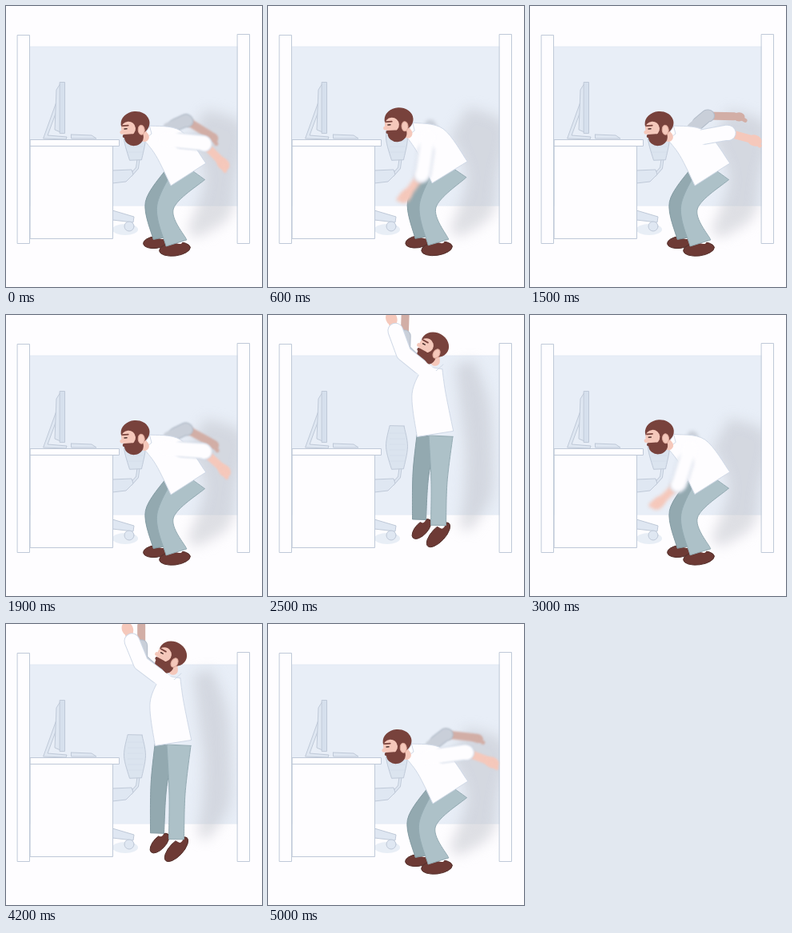
Animation, 320 px wide and 352 px high, one loop 5100 ms. Source, as an HTML page with a canvas:

```html
<!DOCTYPE html>
<html lang="en">
<head>
<meta charset="utf-8">
<title>Cubicle jump</title>
<style>
html, body { margin: 0; width: 100%; height: 100%; overflow: hidden; background: #fefdff; }
canvas { display: block; }
</style>
</head>
<body>
<canvas id="stage" width="320" height="352"></canvas>
<script>
const ctx = document.getElementById('stage').getContext('2d');
const LOOP = 5100, JUMP = 1700, STEP = 100;
const LINE = '#bfc9d8', PALE = '#dfe7f2', WHITE = '#fefdff', FOLD = '#d0d9e7';
const SKIN = '#f5c8bb', HAIR = '#78423c', SHOE = '#6d3a35';

// limbs as joints [x, y, width]: crouched, then stretched
const SHADOW = [
  [[238, 150, 46], [266, 165, 68], [268, 215, 40], [260, 255, 42], [232, 286, 14]],
  [[246, 60, 24], [258, 110, 36], [264, 170, 34], [262, 225, 34], [246, 268, 14]]];
const FAR_LEG = [
  [[212, 212, 28], [184, 248, 20], [192, 291, 16]],
  [[199, 152, 26], [191, 205, 20], [189, 267, 17]]];
const NEAR_LEG = [
  [[232, 206, 40], [199, 252, 21], [213, 297, 27]],
  [[216, 152, 30], [214, 215, 20], [213, 275, 19]]];
const TORSO = [
  [[175, 158, 18], [203, 172, 44], [228, 211, 52]],
  [[206, 66, 24], [201, 98, 42], [209, 149, 46]]];

const mix = (a, b, k) => a + (b - a) * k;
const morph = ([low, high], k) => low.map((joint, i) => joint.map((v, j) => mix(v, high[i][j], k)));

function ramp(x, from, to) {
  const k = Math.min(1, Math.max(0, (x - from) / (to - from)));
  return k * k * (3 - 2 * k);
}

function paint(fill, stroke) {
  if (fill) { ctx.fillStyle = fill; ctx.fill(); }
  if (stroke) { ctx.strokeStyle = stroke; ctx.lineWidth = 1; ctx.stroke(); }
}

function box(x, y, w, h, fill = WHITE, stroke = LINE) {
  ctx.beginPath();
  ctx.rect(x, y, w, h);
  paint(fill, stroke);
}

function poly(points, fill = PALE) {
  ctx.beginPath();
  for (const [x, y] of points) ctx.lineTo(x, y);
  ctx.closePath();
  paint(fill, LINE);
}

function oval(x, y, rx, ry, fill, stroke, turn = 0) {
  ctx.beginPath();
  ctx.ellipse(x, y, rx, ry, turn, 0, 7);
  paint(fill, stroke);
}

function line(points, color, width) {
  ctx.beginPath();
  for (const [x, y] of points) ctx.lineTo(x, y);
  ctx.strokeStyle = color;
  ctx.lineWidth = width;
  ctx.stroke();
}

// smooth closed outline around a chain of joints
function limb(joints, fill, stroke) {
  const left = [], right = [];
  joints.forEach(([x, y, w], i) => {
    const a = joints[Math.max(0, i - 1)], b = joints[Math.min(joints.length - 1, i + 1)];
    const turn = Math.atan2(b[1] - a[1], b[0] - a[0]);
    const dx = Math.sin(turn) * w / 2, dy = -Math.cos(turn) * w / 2;
    left.push([x + dx, y + dy]);
    right.unshift([x - dx, y - dy]);
  });
  ctx.beginPath();
  for (const side of [left, right]) {
    const at = i => side[Math.min(side.length - 1, Math.max(0, i))];
    ctx.lineTo(...side[0]);
    for (let i = 0; i < side.length - 1; i++) {
      const [a, b, c, d] = [at(i - 1), at(i), at(i + 1), at(i + 2)];
      ctx.bezierCurveTo(b[0] + (c[0] - a[0]) / 6, b[1] + (c[1] - a[1]) / 6,
        c[0] - (d[0] - b[0]) / 6, c[1] - (d[1] - b[1]) / 6, ...c);
    }
  }
  ctx.closePath();
  paint(fill, stroke);
}

// one jump: sway with arms back, spring up, hang, land
function pose(phase) {
  const p = (phase + JUMP) % JUMP;
  const fromStart = p > JUMP / 2 ? p - JUMP : p;
  const sway = Math.exp(-(((fromStart - 95) / 140) ** 2));
  const raise = ramp(p, 440, 770) - ramp(p, 1090, 1520);
  return {
    s: ramp(p, 580, 740) - ramp(p, 1100, 1310),
    hop: 18 * Math.max(0, 1 - ((p - 920) / 200) ** 2),
    upper: -12 + 28 * sway + 231 * raise,
    fore: 13 + 52 * sway + 237 * raise
  };
}

function room() {
  ctx.fillStyle = WHITE;
  ctx.fillRect(0, 0, 320, 352);
  box(30, 51, 260, 199, '#e8eef7', '#e3eaf4');
}

function furniture() {
  oval(149, 280, 16, 7, '#e8eef6');
  const arm = [[166, 188], [164, 203], [156, 212]];
  line(arm, LINE, 4);
  line(arm, PALE, 2);
  limb([[161, 139, 18], [161, 165, 27], [162, 193, 15]], '#dbe4ef', LINE);
  for (let y = 148; y < 190; y += 7) line([[152, y], [171, y]], '#d0dae8', .6);
  poly([[133, 206], [157, 205], [159, 211], [150, 220], [133, 222]]);
  poly([[133, 256], [160, 264], [159, 271], [133, 268]]);
  oval(154, 276, 6, 6, PALE, LINE);
  box(30.5, 175.5, 103, 116);
  box(30.5, 167.5, 111, 8);
  poly([[62, 122], [66, 124], [52, 162], [76, 164], [75, 167], [47, 166]]);
  poly([[68, 97], [63, 105], [61, 155], [68, 158]]);
  box(67.5, 95.5, 6, 64, '#d6e0ed');
  poly([[81, 161], [107, 162], [113, 166], [82, 166]]);
  box(14.5, 36.5, 15, 261);
  box(289.5, 35.5, 15, 262);
}

function shadow(s) {
  ctx.save();
  ctx.beginPath();
  ctx.rect(30, 0, 260, 352);
  ctx.clip();
  ctx.filter = 'blur(8px)';
  ctx.globalAlpha = .5;
  limb(morph(SHADOW, s), '#bfc1ca');
  ctx.restore();
}

function step([x, y], deg, length) {
  const r = deg * Math.PI / 180;
  return [x + Math.cos(r) * length, y + Math.sin(r) * length];
}

function arm(shoulder, upper, fore, [upperLength, foreLength], cuff, { width, cloth, edge, skin }) {
  const elbow = step(shoulder, upper, upperLength);
  const wrist = step(elbow, fore, foreLength), palm = step(wrist, fore + 5, 6);
  line([elbow, wrist], skin, 10);
  oval(...palm, width * .45, width * .35, skin, null, fore * Math.PI / 180);
  line([palm, step(palm, fore + 30, 9)], skin, 5);
  const end = step(elbow, fore, foreLength * cuff);
  line([step(shoulder, upper, upperLength * .4), elbow, end], edge, width);
  line([shoulder, elbow, end], cloth, width - 2);
}

const NEAR = { width: 20, cloth: WHITE, edge: FOLD, skin: SKIN };
const FAR = { width: 16, cloth: '#c9cfd9', edge: '#b3bdca', skin: '#d2aea6' };

function head(s) {
  ctx.save();
  ctx.translate(mix(161, 205, s), mix(153, 42, s));
  ctx.rotate(mix(-.08, .5, s));
  line([[7, 6], [11, 12]], SKIN, 12);
  oval(1, -6, 18, 15, HAIR);
  oval(-2, 11, 12, 11, HAIR);
  oval(-8, 0, 9, 9, SKIN);
  oval(-16, 4, 3, 2.5, SKIN);
  oval(8, 3, 4, 6, SKIN, '#e0aa9c');
  line([[-14, 9], [-4, 9]], HAIR, 4);
  line([[-15, -4], [-8, -4]], HAIR, 1.8);
  line([[-13, 0], [-10, 0]], '#4a302c', 1.5);
  ctx.restore();
}

function man({ s, hop, upper, fore }, blur) {
  const at = (x0, y0, x1, y1) => [mix(x0, x1, s), mix(y0, y1, s)];
  const lift = y => y - hop * (y - 150) / 125;
  const leg = shape => morph(shape, s).map(([x, y, w]) => [x, lift(y), w]);
  const swing = (...args) => {
    if (blur > .5) ctx.filter = `blur(${blur}px)`;
    arm(...args);
    ctx.filter = 'none';
  };
  const shoe = ([x, y], rx, ry) => oval(x, lift(y), rx, ry, SHOE, '#54302c', mix(-.12, -.82, s));
  const far = leg(FAR_LEG), near = leg(NEAR_LEG);

  swing(at(203, 153, 197, 70), upper + mix(-30, 6, s), fore + mix(-14, 22, s),
    at(24, 34, 38, 42), mix(.05, .4, s), FAR);
  shoe(at(187, 296, 192, 280), 15.5, 7.5);
  shoe(at(211, 304.5, 213, 288), 19.5, 8.5);
  for (const [x, y] of [far[2], near[2]]) line([[x - 4, y - 5], [x + 4, y - 3 + 3 * s]], WHITE, 8);
  limb(far, '#93a9b0', '#849ba3');
  limb(near, '#adc1c8', '#93aab2');
  limb(morph(TORSO, s), WHITE, FOLD);
  line([at(172, 168, 196, 72), at(182, 160, 210, 70), at(179, 149, 219, 62)], FOLD, 1);
  head(s);
  swing(at(200, 167, 203, 75), upper, fore, at(47, 30, 43, 40), mix(.05, .75, s), NEAR);
}

function frame(now) {
  const t = Math.floor(now % LOOP / STEP) * STEP;
  // the last leap starts a touch late
  const phase = t - 48 * Math.exp(-(((t - 4200) / 300) ** 2));
  const body = pose(phase % JUMP);
  const blur = Math.min(2, Math.abs(pose(phase % JUMP + 60).fore - body.fore) / 16);
  room();
  shadow(body.s);
  furniture();
  man(body, blur);
  requestAnimationFrame(frame);
}

ctx.lineCap = ctx.lineJoin = 'round';
requestAnimationFrame(frame);
</script>
</body>
</html>
```
